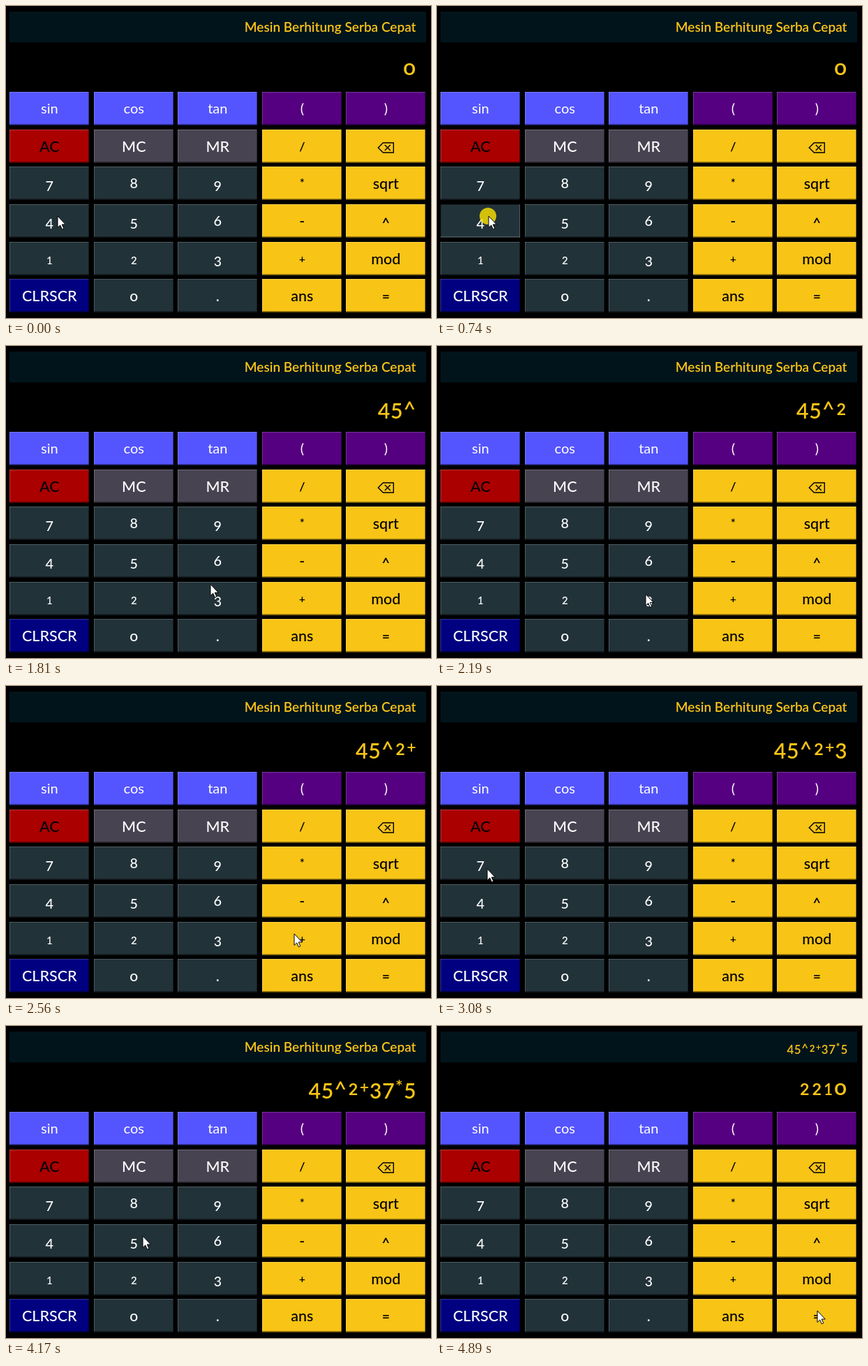
Recreate the animation shown at these times as an HTML page with a canvas. Size 609 px wide and 447 px high, loop 5.67 s.

```html
<!DOCTYPE html>
<html lang="id">
<head>
<meta charset="utf-8">
<title>Kalkulator</title>
<style>
html, body { margin: 0; width: 609px; height: 447px; overflow: hidden; background: #000; }
canvas { display: block; }
</style>
</head>
<body>
<canvas id="stage" width="609" height="447"></canvas>
<script>
const ctx = document.getElementById('stage').getContext('2d');
const LOOP = 5670;
const GOLD = '#f8c416', BLUE = '#5555ff', PURPLE = '#550080', GRAY = '#484351', SLATE = '#223239';
const TITLE = 'Mesin Berhitung Serba Cepat';

const rows = [
  ['sin', 'cos', 'tan', '(', ')'],
  ['AC', 'MC', 'MR', '/', '⌫'],
  ['7', '8', '9', '*', 'sqrt'],
  ['4', '5', '6', '-', '^'],
  ['1', '2', '3', '+', 'mod'],
  ['CLRSCR', '0', '.', 'ans', '=']
];

// Old-style figures and small operators, in em: ink height, ink middle, advance
const low = [.69, .165, .57], high = [.7, .35, .58];
const glyphs = {
  0: [.53, .255, .62, 'o'], 1: [.52, .26, .47], 2: [.52, .26, .55, '2', 'Inter'],
  3: low, 4: low, 5: low, 7: low, 9: low, 6: high, 8: high,
  '^': [.36, .41, .6], '+': [.37, .33, .44], '*': [.27, .54, .4],
  '/': [.68, .34, .5], '=': [.24, .29, .5]
};

// Cursor moves: start, end, x, y at the end
const moves = [
  [0, 0, 74, 301], [870, 1050, 161, 306], [1240, 1500, 530, 304],
  [1655, 1895, 200, 356], [2110, 2280, 413, 355], [2600, 2740, 310, 350],
  [2870, 3060, 72, 262], [3230, 3550, 411, 258], [3760, 4000, 196, 301],
  [4180, 4650, 545, 408]
];

// Key presses: down, up, key
const presses = [
  [740, 850, '4'], [1080, 1200, '5'], [1530, 1640, '^'], [1990, 2100, '2'],
  [2420, 2520, '+'], [2760, 2860, '3'], [3100, 3210, '7'], [3600, 3750, '*'],
  [4040, 4170, '5'], [4840, 4890, '=']
];

const font = (size, weight, family = 'Lato') => `${weight} ${size}px ${family}, sans-serif`;

function drawGlyph(ch, x, y, size, weight) {
  const [h, mid, , shape = ch, family] = glyphs[ch];
  ctx.font = font(100, weight, family);
  const m = ctx.measureText(shape);
  const up = m.actualBoundingBoxAscent, down = m.actualBoundingBoxDescent;
  const k = h * size / (up + down);
  ctx.font = font(100 * k, weight, family);
  ctx.textAlign = 'center';
  ctx.fillText(shape, x, y - mid * size + (up - down) * k / 2);
}

function drawExpr(text, right, y, size, weight) {
  for (const ch of [...text].reverse()) {
    const adv = glyphs[ch][2] * size;
    drawGlyph(ch, right - adv / 2, y, size, weight);
    right -= adv;
  }
}

function line(points, close) {
  ctx.beginPath();
  points.forEach(([x, y]) => ctx.lineTo(x, y));
  if (close) ctx.closePath();
}

function drawErase(x, y) {
  ctx.strokeStyle = '#000';
  ctx.lineWidth = 1.4;
  line([[x - 11, y], [x - 4, y - 7], [x + 11, y - 7], [x + 11, y + 7], [x - 4, y + 7]], true);
  ctx.stroke();
  for (const s of [-1, 1]) {
    line([[x - 1.5, y - 4 * s], [x + 6.5, y + 4 * s]]);
    ctx.stroke();
  }
}

function keyColor(key, r, c) {
  if (key === 'AC') return '#aa0000';
  if (key === 'CLRSCR') return '#000080';
  if (r === 0) return c < 3 ? BLUE : PURPLE;
  if (c > 2) return GOLD;
  return r === 1 ? GRAY : SLATE;
}

function drawKey(key, r, c, down) {
  const x = Math.round(5 + c * 120.5), y = Math.round(123 + r * 53.65);
  const w = 114, h = 47.5, cx = x + 57.3, base = y + 31.6;
  ctx.fillStyle = keyColor(key, r, c);
  ctx.fillRect(x, y, w, h);
  const light = 'rgba(255,255,255,.2)', dark = 'rgba(0,0,0,.4)';
  ctx.fillStyle = down ? dark : light;
  ctx.fillRect(x, y, w, 1);
  ctx.fillRect(x, y, 1, h);
  ctx.fillStyle = down ? light : dark;
  ctx.fillRect(x, y + h - 1.5, w, 1.5);
  ctx.fillRect(x + w - 1, y, 1, h);

  ctx.fillStyle = r && (c > 2 || key === 'AC') ? '#000' : '#fff';
  if (key === '⌫') return drawErase(cx, y + 26);
  if (glyphs[key]) return drawGlyph(key, cx, base, 21, c > 2 ? 600 : 500);
  ctx.font = font(r ? 21.5 : 20, r ? 500 : 400);
  ctx.textAlign = 'center';
  ctx.fillText(key, cx, base - (r ? 0 : .6));
}

function cursorAt(t) {
  let [, , x, y] = moves[0];
  for (const [from, to, tx, ty] of moves.slice(1)) {
    if (t < from) break;
    const p = Math.min(1, (t - from) / (to - from)), e = p * p * (3 - 2 * p);
    x += (tx - x) * e;
    y += (ty - y) * e;
  }
  return [x, y];
}

function drawCursor(x, y) {
  const arrow = [[0, 0], [0, 16.5], [3.7, 13], [6.3, 18.8], [8.8, 17.7], [6.2, 12], [11.3, 12]];
  line(arrow.map(([ax, ay]) => [x + ax, y + ay]), true);
  ctx.fillStyle = '#fff';
  ctx.fill();
  ctx.strokeStyle = '#000';
  ctx.lineWidth = 1;
  ctx.stroke();
}

function draw(t) {
  const typed = presses.filter(p => t >= p[1]).map(p => p[2]).join('');
  const done = typed.endsWith('=');
  const held = presses.find(p => t >= p[0] && t < p[1]);

  ctx.fillStyle = '#000';
  ctx.fillRect(0, 0, 609, 447);
  ctx.fillStyle = '#02141b';
  ctx.fillRect(5, 8, 597, 44);
  ctx.fillStyle = GOLD;
  if (done) {
    drawExpr(typed.slice(0, -1), 588.5, 36.5, 18, 600);
  } else {
    ctx.font = font(19, 600);
    ctx.textAlign = 'right';
    ctx.fillText(TITLE, 587.5, 37);
  }
  drawExpr(done ? '2210' : typed || '0', 588, 98.5, 32, 600);

  rows.forEach((row, r) => row.forEach((key, c) => drawKey(key, r, c, held && held[2] === key)));

  const [x, y] = cursorAt(t);
  if (held) {
    ctx.fillStyle = 'rgba(255,228,0,.8)';
    ctx.beginPath();
    ctx.arc(x - 1, y, 12, 0, 7);
    ctx.fill();
  }
  drawCursor(x, y);
}

const start = performance.now();
function tick() {
  draw((performance.now() - start) % LOOP);
  requestAnimationFrame(tick);
}
tick();
</script>
</body>
</html>
```
